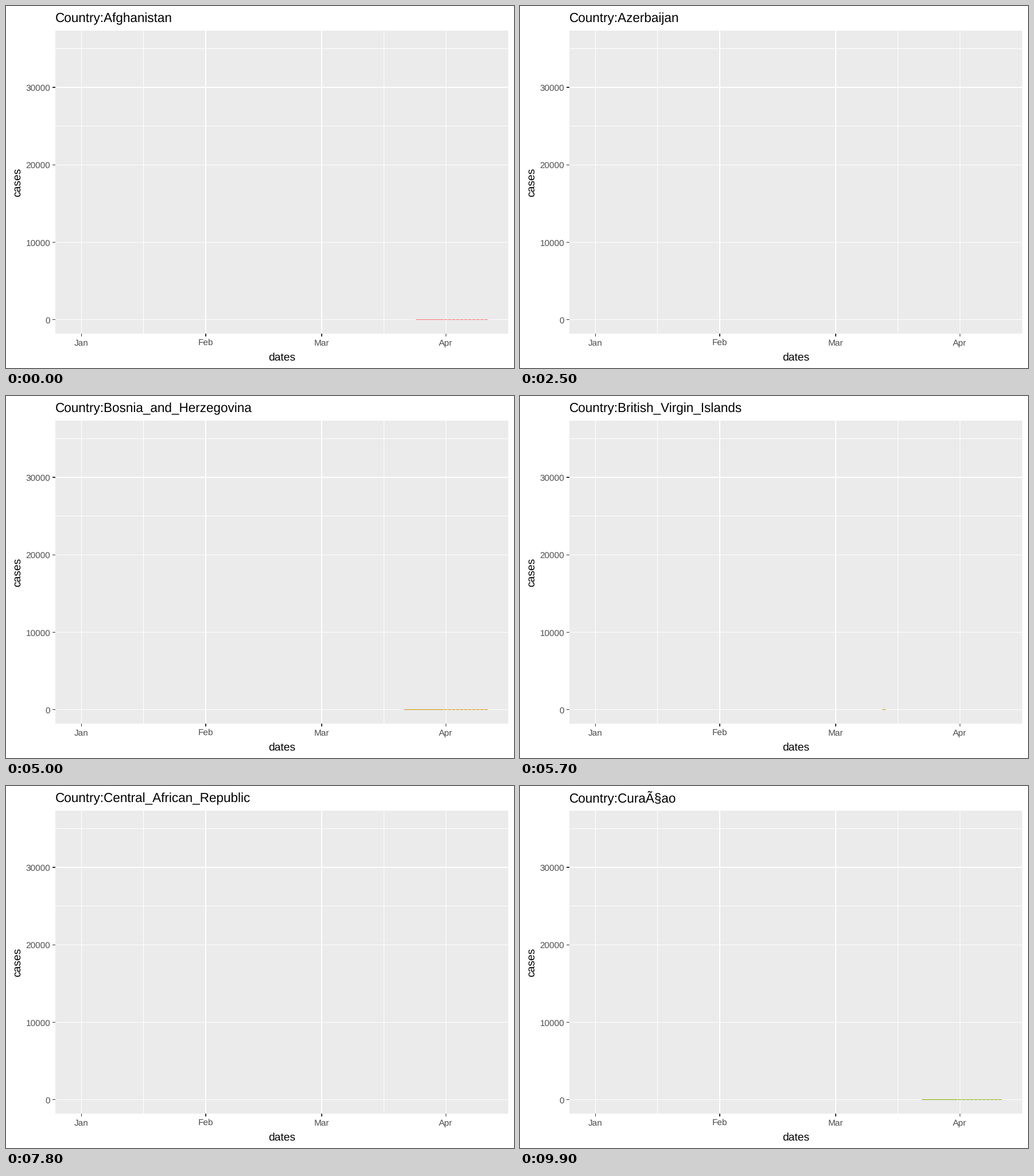
Recreate the animation shown at these times as a matplotlib script. Size 885 px wide and 632 px high, loop 10000 ms.

```python
import numpy as np
import matplotlib.pyplot as plt
from matplotlib.animation import FuncAnimation
from matplotlib.collections import PolyCollection

W, H, DPI = 885, 632, 64
PX = 72 / DPI                       # points per pixel
LEFT, RIGHT, TOP, BOTTOM = 86, 875, 43, 572
ZERO_Y, CASE_PX = 547.66, 0.01352
JAN1_X, DAY_PX = 131.6, 6.975
MAJOR, MINOR = 1.4, 0.7             # line widths in pixels
LEVELS = 206                        # countries sharing the colour wheel
DAYS = np.arange(-60, 43)           # 1 = 1 March, 32 = 1 April

plt.rcParams["font.family"] = "Liberation Sans"
plt.rcParams["text.hinting"] = "none"


def wave(peak, mid=36, spread=12):
    """Daily cases as a bell curve around its middle day."""
    return peak * np.exp(-((DAYS - mid) / spread) ** 2)


quiet = """Angola Anguilla Antigua_and_Barbuda Aruba Bahamas Barbados Belize
Benin Bermuda Bhutan Botswana British_Virgin_Islands Burundi Cape_Verde
Cayman_Islands Central_African_Republic Chad Congo CuraÃ§ao""".split()
quiet.append("Bonaire, Saint Eustatius and Saba")

waves = {
    "Afghanistan": wave(36),
    "Albania": wave(22),
    "Algeria": wave(115),
    "Andorra": wave(30),
    "Argentina": wave(120),
    "Armenia": wave(60),
    "Australia": wave(430, 27, 8),
    "Austria": wave(900, 27, 9),
    "Azerbaijan": wave(75),
    "Bahrain": wave(40),
    "Bangladesh": wave(110, 42, 4),
    "Belarus": wave(450, 43, 5),
    "Belgium": wave(1550),
    "Bolivia": wave(20),
    "Bosnia_and_Herzegovina": wave(50),
    "Brazil": wave(1900, 42),
    "Brunei_Darussalam": wave(20, 13, 0.5),
    "Bulgaria": wave(30),
    "Burkina_Faso": wave(25),
    "Cambodia": wave(25, 22, 2),
    "Cameroon": wave(70),
    "Canada": wave(1400, 38),
    "Cases_on_an_international_conveyance_Japan": wave(80, -13, 6),
    "Chile": wave(420, 40),
    "China": wave(3600, -22, 9) + wave(13000, -16, 0.4) + wave(90, 20, 20),
    "Colombia": wave(190, 42),
    "Costa_Rica": wave(25),
    "Cote_dIvoire": wave(35),
    "Croatia": wave(75),
    "Cuba": wave(50, 42),
    "Cyprus": wave(35),
}
names = sorted(quiet + list(waves))


def hue_colour(index):
    """Evenly spaced hue in polar LUV with lightness 65 and chroma 100."""
    hue = np.radians(15 + 360 * index / LEVELS)
    y = ((65 + 16) / 116) ** 3
    u = 100 * np.cos(hue) / (13 * 65) + 0.19784
    v = 100 * np.sin(hue) / (13 * 65) + 0.46834
    x = 9 * y * u / (4 * v)
    z = -x / 3 - 5 * y + 3 * y / v
    linear = np.clip([3.2406 * x - 1.5372 * y - 0.4986 * z,
                      -0.9689 * x + 1.8758 * y + 0.0415 * z,
                      0.0557 * x - 0.2040 * y + 1.0570 * z], 0, 1)
    return np.where(linear > 0.00304, 1.055 * linear ** (1 / 2.4) - 0.055,
                    12.92 * linear)


def day_x(day):
    return JAN1_X + DAY_PX * (day + 59)


def case_y(cases):
    return ZERO_Y - CASE_PX * cases


def bars(index):
    """Outlines of the pixel-snapped daily bars of one country."""
    if names[index] in quiet:
        return []
    noise = np.random.default_rng(index).normal(0, 0.2, DAYS.size)
    tops = np.rint(case_y(waves[names[index]] * np.exp(noise)))
    starts = np.rint(day_x(DAYS - 0.45))
    ends = np.rint(day_x(DAYS + 0.45))
    base = round(ZERO_Y)
    return [[(a, base), (a, top), (b, top), (b, base)]
            for a, b, top in zip(starts, ends, tops) if top < base]


fig = plt.figure(figsize=(W / DPI, H / DPI), dpi=DPI, facecolor="white")
ax = fig.add_axes([0, 0, 1, 1])
ax.set(xlim=(0, W), ylim=(H, 0))
ax.axis("off")


def box(x0, y0, x1, y1, colour):
    ax.add_patch(plt.Rectangle((x0, y0), x1 - x0, y1 - y0, fc=colour, lw=0))


def v_line(x, y0, y1, width, colour="white"):
    box(x - width / 2, y0, x + width / 2, y1, colour)


def h_line(y, x0, x1, width, colour="white"):
    box(x0, y - width / 2, x1, y + width / 2, colour)


def label(x, y, text, px, colour="black", ha="center", **style):
    return ax.text(x, y, text, fontsize=px * PX, color=colour, ha=ha,
                   va="baseline", **style)


box(LEFT, TOP, RIGHT, BOTTOM, "#EBEBEB")
months = {"Jan": -59, "Feb": -28, "Mar": 1, "Apr": 32}
starts = list(months.values())

for first, following in zip(starts, starts[1:]):
    v_line(day_x((first + following) / 2), TOP, BOTTOM, MINOR)
for cases in range(5000, 40000, 10000):
    h_line(case_y(cases), LEFT, RIGHT, MINOR)

for month, day in months.items():
    x = day_x(day)
    v_line(x, TOP, BOTTOM, MAJOR)
    v_line(x, BOTTOM, BOTTOM + 4.8, MAJOR, "#333333")
    label(x, 593.3, month, 15.4, "#4D4D4D")
for cases in range(0, 40000, 10000):
    y = case_y(cases)
    h_line(y, LEFT, RIGHT, MAJOR)
    h_line(y, LEFT - 4.8, LEFT, MAJOR, "#333333")
    label(77.3, y + 6, str(cases), 15.4, "#4D4D4D", "right")

label(480.5, 619, "dates", 19.2)
label(25, 307.5, "cases", 19.2, rotation=90, rotation_mode="anchor")
title = label(86, 28, "", 22.5, ha="left")
columns = PolyCollection([], linewidths=0, zorder=3)
ax.add_collection(columns, autolim=False)


def update(frame):
    # New bars arrive one step before the title catches up.
    shown = (frame + 1) // 2
    columns.set_verts(bars(shown))
    columns.set_facecolor([hue_colour(shown)])
    title.set_text("Country:" + names[frame // 2])
    return columns, title


anim = FuncAnimation(fig, update, frames=100, interval=100, repeat=True,
                     repeat_delay=0, blit=False)
plt.show()
```
